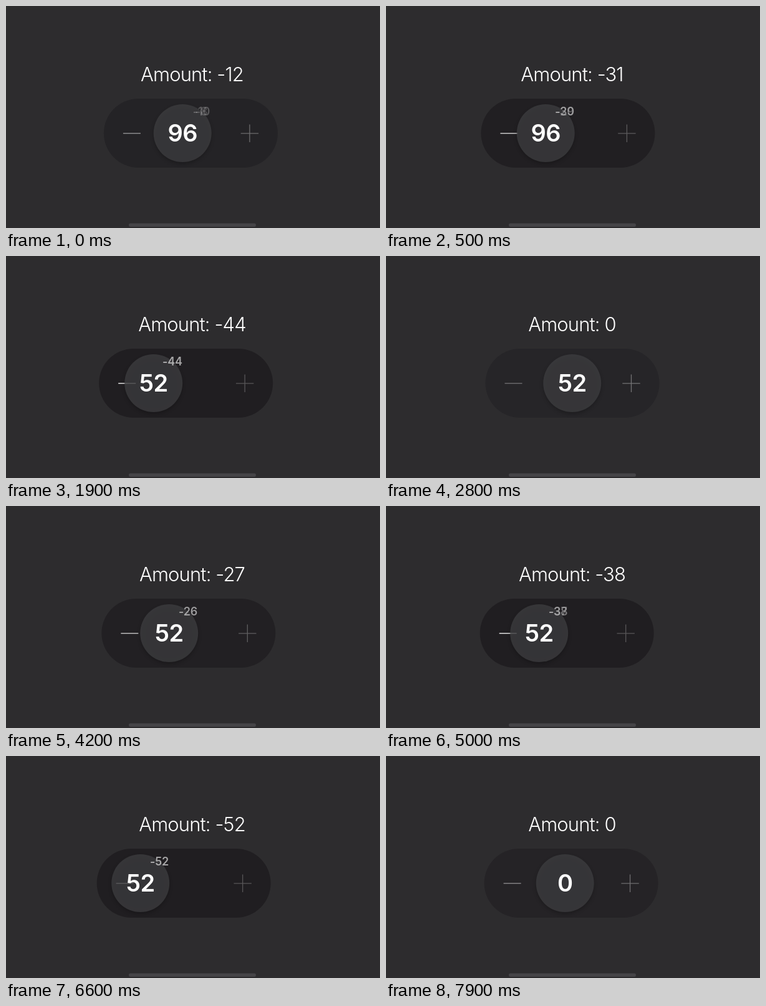
Recreate the animation shown at these times as an HTML page. Size 600 px wide and 357 px high, loop 8 s.

```html
<!DOCTYPE html>
<html lang="en">
<head>
<meta charset="utf-8">
<title>Amount stepper</title>
<style>
  html, body { margin: 0; width: 100%; height: 100%; overflow: hidden; background: #2d2c2e; }
  svg { display: block; width: 600px; height: 357px; }
  text { font-family: Inter, Roboto, sans-serif; fill: #fff; text-anchor: middle; }
  #amount { font-size: 31px; font-weight: 300; letter-spacing: -0.9px; }
  #value { font-size: 38px; font-weight: 600; letter-spacing: -0.6px; }
  .label { font-size: 18px; font-weight: 600; letter-spacing: -0.2px; }
  .icon { stroke: #fff; stroke-width: 1.3; fill: none; }
</style>
</head>
<body>
<svg viewBox="0 0 600 357">
  <defs>
    <filter id="soft" x="-30%" y="-30%" width="160%" height="160%">
      <feGaussianBlur stdDeviation="3"/>
    </filter>
  </defs>
  <rect width="600" height="357" fill="#2d2c2e"/>
  <rect x="197" y="349.5" width="204" height="5.5" rx="2.7" fill="#454447"/>
  <text id="amount" x="298.5" y="120.5"></text>
  <g id="track">
    <rect id="pill" x="159.5" y="149" width="279" height="111" rx="55.5"/>
    <path id="minus" class="icon" d="M190.5 204.8h28"/>
    <path id="plus" class="icon" d="M379.3 204.8h28.4M393.5 190.6v28.4"/>
  </g>
  <g id="knob">
    <circle cx="298.7" cy="207.5" r="46" fill="#000" opacity=".25" filter="url(#soft)"/>
    <circle cx="298.7" cy="204.5" r="46.5" fill="#3f3e41" opacity=".76"/>
    <text id="value" x="298.7" y="218.3"></text>
    <text class="label" x="329" y="176"></text>
    <text class="label" x="329" y="176"></text>
  </g>
</svg>
<script>
const LOOP = 8000, STEP = 100, SECOND_DRAG = 3900;
const $ = id => document.getElementById(id);
const labels = document.querySelectorAll('.label');

// [time, knob offset]; both drags share the opening stretch
const opening = [[-200, 0], [-100, -9.6], [0, -15.5], [100, -26], [200, -35.2], [300, -37],
  [500, -42.5], [700, -48], [900, -51], [1000, -52], [1100, -53]];
const spring = [[0, 0.6], [100, 0.16], [200, -0.06], [300, -0.11], [400, -0.04], [500, 0]];
const release = (start, from) => spring.map(([t, k]) => [start + t, from * k]);

const path = [
  ...opening, [1800, -62], [2200, -62], ...release(2300, -62),
  ...opening.map(([t, x]) => [t + SECOND_DRAG, x]),
  [5500, -64], [6400, -83], [6700, -83], ...release(6800, -83),
  [7800, 0], [7900, -11.5], [8000, -15.5]
];

const mix = (a, b, k) => a + (b - a) * k;

function offsetAt(t) {
  const i = path.findIndex(p => p[0] >= t);
  if (i <= 0) return path[0][1];
  const [t0, x0] = path[i - 1], [t1, x1] = path[i];
  return mix(x0, x1, (t - t0) / (t1 - t0));
}

const valueAt = t => t < 1900 ? 96 : t < 6800 ? 52 : 0;

function amountAt(t) {
  const pull = -offsetAt(t);
  const released = t >= 2300 && t <= 3700;
  if (released || pull < 1) return 0;
  return -Math.min(Math.round(1.4 + 0.69 * pull), valueAt(t)) || 0;
}

function setLabel(el, n, opacity) {
  el.textContent = n;
  el.setAttribute('opacity', n ? opacity : 0);
}

function draw(t) {
  const x = offsetAt(t), pull = Math.max(0, -x), k = Math.min(1, pull / 53);
  $('track').setAttribute('transform', `translate(${x / 6} 0)`);
  $('knob').setAttribute('transform', `translate(${x} 0)`);
  $('pill').setAttribute('fill', `rgb(${mix(38, 32, k)},${mix(37, 30, k)},${mix(40, 33, k)})`);
  $('minus').setAttribute('opacity', mix(0.36, 1, k));
  $('plus').setAttribute('opacity', mix(0.36, 0.25, k));
  $('amount').textContent = 'Amount: ' + amountAt(t);
  $('value').textContent = valueAt(t);

  // the small label trails the amount and cross-fades between numbers
  const fresh = amountAt(t - 50), old = amountAt(t - 100);
  const alpha = Math.min(0.6, 0.22 + 0.009 * pull);
  const same = fresh === old;
  setLabel(labels[0], fresh, same ? alpha : alpha * 0.65);
  setLabel(labels[1], same ? 0 : old, alpha * 0.5);
}

const start = performance.now();
function tick() {
  const t = (performance.now() - start) % LOOP;
  draw(Math.floor(t / STEP) * STEP);
  requestAnimationFrame(tick);
}
tick();
</script>
</body>
</html>
```
